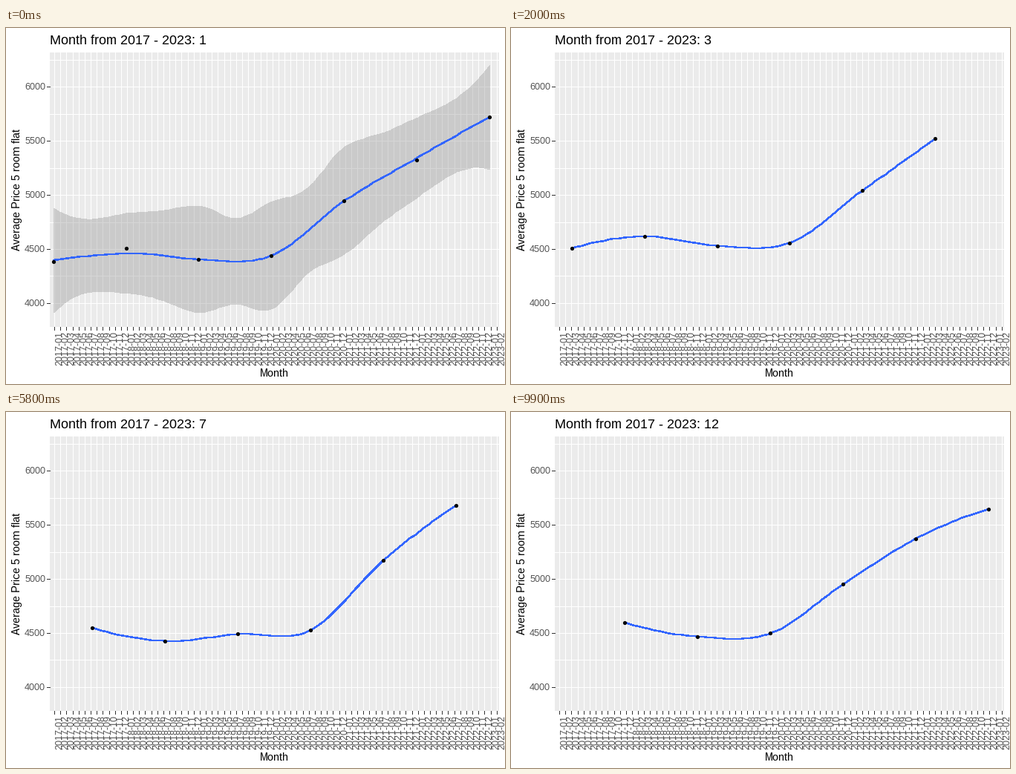
Recreate the animation shown at these times as a matplotlib script. Size 672 by 480 pixels, loop 10000 ms.

```python
import numpy as np
import matplotlib.pyplot as plt
from matplotlib.animation import FuncAnimation
from matplotlib.patches import Circle, Polygon, Rectangle

plt.rcParams.update({
    "font.family": "Liberation Sans",
    "text.hinting": "native",
    "text.hinting_factor": 1,
    "text.kerning_factor": 6,
})

W, H, DPI = 672, 480, 96
PT = 72 / DPI                      # points per pixel
FRAMES, STEP = 100, 9              # frames in the loop, frames per month
LEFT, RIGHT, TOP, BOTTOM = 59, 664, 33, 403
X0, DX = 64.1, 8.16                # first month position and month spacing
Y0, DY = 369.9, 0.1457             # position of 4000 and pixels per unit
MONTHS = 74
GREY = "#4D4D4D"

# Turning points of the price history: months since 2017-01, price
HISTORY = [(0, 4475), (14, 4620), (20, 4350), (25, 4535), (34, 4450),
           (37, 4575), (42, 4480), (48, 5040), (50, 5030), (56, 5215),
           (61, 5470), (68, 5735), (71, 5640), (72, 5818), (73, 5600)]
JANUARY_DIP = 100


def price(t):
    return np.interp(t, *zip(*HISTORY)) - JANUARY_DIP * (t % 12 == 0)


def px_x(month):
    return X0 + DX * np.asarray(month, float)


def px_y(value):
    return Y0 - (np.asarray(value, float) - 4000) * DY


def centre(v):
    return np.round(v) + 0.5


def local_fit(n, i, span=0.75):
    """Weights giving value and slope of the local quadratic at node i."""
    d = np.arange(n) - i
    h = np.sort(abs(d))[int(span * n) - 1]
    w = np.sqrt(np.clip(1 - (abs(d) / h) ** 3, 0, None) ** 3)
    basis = np.vander(d, 3, increasing=True)
    return (np.linalg.pinv(basis * w[:, None]) * w)[:2]


def loess(n, count=80):
    """Operator from n yearly values to the blended curve, and its grid."""
    fits = np.array([local_fit(n, i) for i in range(n)])
    t = np.linspace(0, n - 1, count)
    j = np.minimum(t.astype(int), n - 2)
    u = (t - j)[:, None]
    val, slope = fits[:, 0], fits[:, 1]
    curve = ((1 + 2 * u) * (1 - u) ** 2 * val[j] + u * (1 - u) ** 2 * slope[j]
             + u * u * (3 - 2 * u) * val[j + 1] + u * u * (u - 1) * slope[j + 1])
    return curve, t


def month_state(m):
    t = np.arange(m, MONTHS, 12)
    y = price(t)
    curve, grid = loess(len(t))
    spread = (494 - 150 * m) * DY * np.linalg.norm(curve, axis=1)
    return {
        "points": np.column_stack([px_x(t), px_y(y)]),
        "line": np.column_stack([px_x(m + 12 * grid), px_y(curve @ y)]),
        "half": spread if len(t) == 7 else None,
    }


STATES = [month_state(m) for m in range(12)]

fig = plt.figure(figsize=(W / DPI, H / DPI), dpi=DPI, facecolor="white")
ax = fig.add_axes([0, 0, 1, 1])
ax.set_xlim(0, W)
ax.set_ylim(H, 0)
ax.axis("off")


def rules(x0, x1, y0, y1, color):
    xs = np.broadcast_arrays(x0, x1, y0, y1)
    ax.plot([xs[0], xs[1]], [xs[2], xs[3]], color=color, lw=PT,
            solid_capstyle="butt", antialiased=False, zorder=1)


def label(x, y, s, size, color="black", **kw):
    kw = {"ha": "left", "va": "baseline", **kw}
    return ax.text(x, y, s, fontsize=size * PT, color=color,
                   rotation_mode="anchor", **kw)


# Panel, grid and axes
ax.add_patch(Rectangle((LEFT, TOP), RIGHT - LEFT, BOTTOM - TOP, fc="#EBEBEB",
                       ec="none", antialiased=False, zorder=0))
months = np.arange(MONTHS)
cols = centre(px_x(months))
rows = centre(px_y(np.arange(4000, 6251, 250)))
rules(LEFT, RIGHT, rows, rows, "white")
rules(cols, cols, TOP, BOTTOM, "white")
rules(cols, cols, BOTTOM, BOTTOM + 4, "#333333")
rules(LEFT - 4, LEFT, rows[::2], rows[::2], "#333333")

for value, y in zip(range(4000, 6001, 500), rows[::2]):
    label(53, y + 4.5, str(value), 12, GREY, ha="right")
for m, x in zip(months, px_x(months)):
    label(round(x + 11), 455, f"{2017 + m // 12}-{m % 12 + 1:02d}", 12, GREY,
          rotation=90)
label(361, 470, "Month", 15, ha="center")
label(19, 217.5, "Average Price 5 room flat", 15, ha="center", rotation=90)
title = label(LEFT, 22, "", 18)

# Moving parts
ribbon = ax.add_patch(Polygon(np.zeros((3, 2)), fc="#999999", alpha=0.4,
                              ec="none", lw=0, antialiased=False, zorder=2))
line, = ax.plot([], [], color="#3366FF", lw=1.5 * PT, antialiased=False,
                solid_capstyle="butt", solid_joinstyle="round", zorder=3)
dots = [ax.add_patch(Circle((0, 0), 2.6, fc="black", ec="none", lw=0, zorder=4))
        for _ in range(7)]


def update(i):
    k, f = divmod(i, STEP)
    f /= STEP
    a = STATES[k]
    b = STATES[k + 1] if f else a

    def mix(p, q):
        return p + (q - p) * f

    title.set_text(f"Month from 2017 - 2023: {round(1 + i / STEP)}")

    path = mix(a["line"], b["line"])
    line.set_data(*np.round(path).T)

    show = a["half"] is not None and b["half"] is not None
    ribbon.set_visible(show)
    if show:
        off = np.column_stack([np.zeros(len(path)), mix(a["half"], b["half"])])
        ribbon.set_xy(np.round(np.vstack([path - off, (path + off)[::-1]])))

    # A point with no partner waits in place until the next month
    n = len(b["points"])
    pts = a["points"].copy()
    pts[:n] = mix(pts[:n], b["points"])
    for j, dot in enumerate(dots):
        dot.set_visible(j < len(pts))
        if j < len(pts):
            dot.center = np.floor(pts[j, 0]) + 0.5, centre(pts[j, 1])
    return [title, ribbon, line, *dots]


anim = FuncAnimation(fig, update, frames=FRAMES, interval=100, repeat=True,
                     repeat_delay=0)
plt.show()
```
